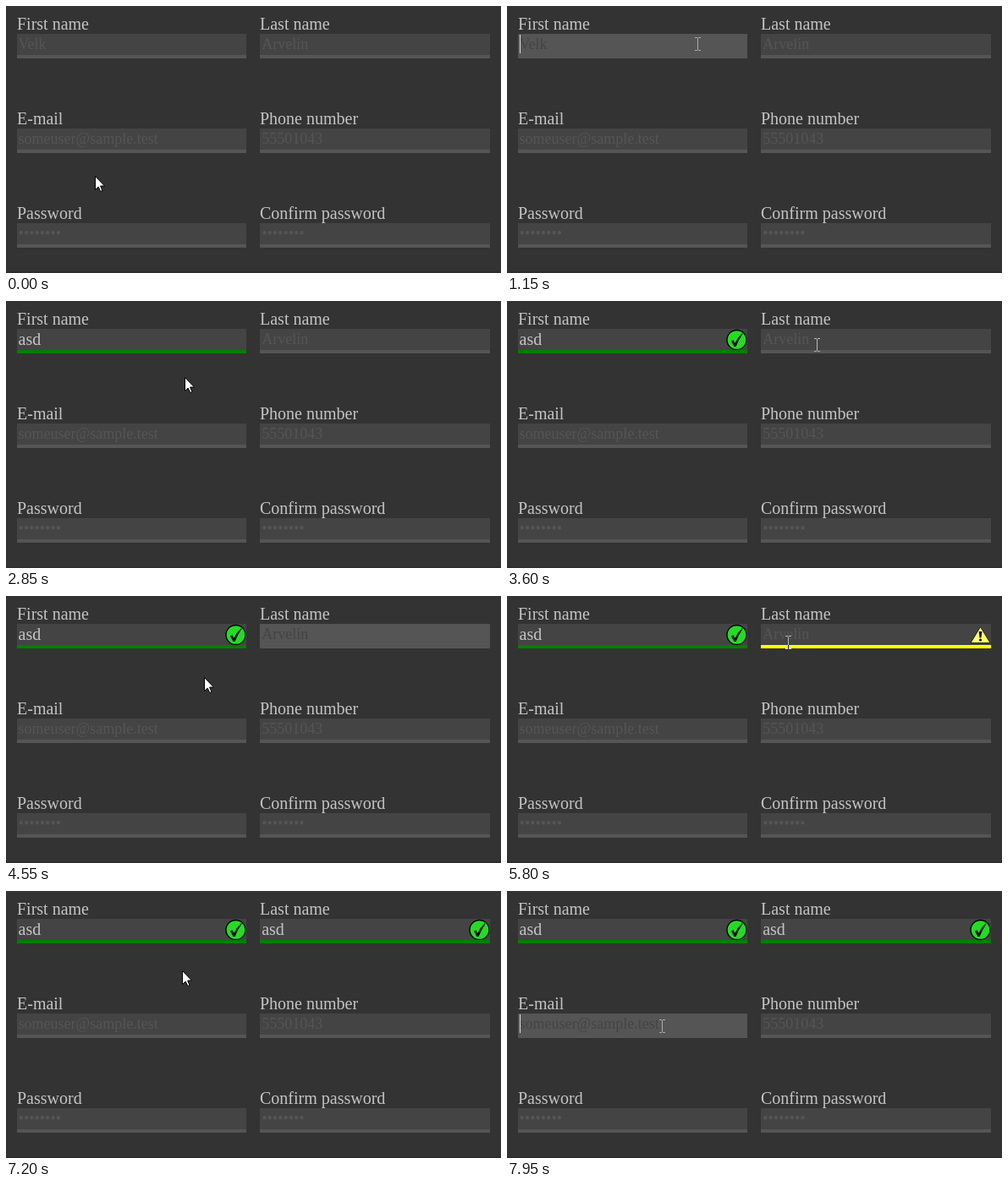
These frames come from a looping animation (585 by 316 pixels, 8 s). An HTML page:

```html
<!DOCTYPE html>
<html lang="en">
<head>
<meta charset="utf-8">
<title>Form validation</title>
<style>
  html, body { margin: 0; height: 100%; overflow: hidden; background: #333; }
  svg { display: block; width: 585px; height: 316px; font: 20px "Liberation Serif", serif; isolation: isolate; }
  .label, .value { fill: #c4c4c4; }
  .hint { font-size: 18px; }
  #beam { mix-blend-mode: difference; }
</style>
</head>
<body>
<svg id="stage" viewBox="0 0 585 316">
  <defs>
    <g id="check">
      <circle r="11.5" fill="#2d2" stroke="#000" stroke-width="1.3"/>
      <path d="M-6.5 1.5L-4 .2L-2 4Q1-3 6.5-8L7-7Q2 0-1 8H-3Z"/>
    </g>
    <g id="warn">
      <path d="M0-9.5L11.5 9.5H-11.5Z" fill="#ff6" stroke="#222" stroke-linejoin="round"/>
      <path d="M-1.8-4H1.8L.9 3.5H-.9Z"/>
      <circle cy="6" r="1.6"/>
    </g>
  </defs>
  <rect width="585" height="316" fill="#333"/>
  <rect y="314" width="585" height="2" fill="#2d2d2d"/>
  <g id="form"></g>
  <rect id="caret" width="1" height="22" fill="#ddd"/>
  <path id="beam" d="M-3-7.5H0M1-7.5H4M.5-7V7M-3 7.5H0M1 7.5H4" fill="none" stroke="#fff" shape-rendering="crispEdges"/>
  <path id="arrow" d="M.5.5V16.5L4.2 13L6.8 18.5L9 17.5L6.6 12H11.5Z" fill="#fff" stroke="#000"/>
</svg>
<script>
const LOOP = 8000, STEP = 50;
const $ = id => document.getElementById(id);

function add(name, attrs, text = '') {
  const el = document.createElementNS('http://www.w3.org/2000/svg', name);
  set(el, attrs);
  el.textContent = text;
  return $('form').appendChild(el);
}
function set(el, attrs) {
  for (const key in attrs) el.setAttribute(key, attrs[key]);
}
const show = (el, on) => set(el, { visibility: on ? 'visible' : 'hidden' });
const within = (t, spans = []) => spans.some(([from, to]) => t >= from && t < to);

function makeField(label, hint, col, row, timing = {}) {
  const x = col ? 300 : 13, y = 33 + row * 112, width = col ? 272 : 271;
  const textX = col ? 302.2 : 14.6;
  add('text', { x, y: y - 5, class: 'label' }, label);
  return {
    x, y, width, textX, ...timing,
    box: add('rect', { x, y, width, height: 25 }),
    line: add('rect', { x, y: y + 25, width, height: 4 }),
    hint: add('text', { x: textX, y: y + 18, class: 'hint' }, hint),
    value: add('text', { x: textX, y: y + 19, class: 'value' }),
    icon: add('use', { x: x + width - 12.5, y: y + 13 })
  };
}

const fields = [
  makeField('First name', 'Velk', 0, 0, {
    focus: [[1150, 2750]], caret: [[1150, 1700], [2200, 2750]],
    typed: 1900, icons: [[2900, LOOP]]
  }),
  makeField('Last name', 'Arvelin', 1, 0, {
    focus: [[4000, 5000], [5950, 7200]], caret: [[4000, 4550], [5950, 6450], [7000, 7200]],
    warned: 5000, typed: 6350, icons: [[5150, 5950], [7200, LOOP]]
  }),
  makeField('E-mail', 'someuser@sample.test', 0, 1, {
    focus: [[7900, LOOP]], caret: [[7950, LOOP]]
  }),
  makeField('Phone number', '55501043', 1, 1),
  makeField('Password', '••••••••', 0, 2),
  makeField('Confirm password', '••••••••', 1, 2)
];

// Pointer moves: start, end, x, y
const moves = [
  [0, 0, 105, 201], [0, 850, 224, 45], [850, 900, 225, 44.5],
  [1250, 1450, 221, 62], [2300, 2300, 220, 66], [2350, 2500, 211, 90],
  [3200, 3600, 366, 52], [4150, 4550, 234, 96], [5400, 5550, 314, 64],
  [5650, 5800, 332, 55], [6600, 6600, 324, 58], [6650, 6850, 208, 94],
  [7250, 7500, 183, 160]
];
const typingHides = [[1900, 2350], [6350, 6650]];

function pointerAt(t) {
  let px = 0, py = 0;
  for (const [from, to, x, y] of moves) {
    if (t < from) break;
    const p = to > from ? Math.min(1, (t - from) / (to - from)) : 1;
    const ease = p * p * (3 - 2 * p);
    px += (x - px) * ease;
    py += (y - py) * ease;
  }
  return [Math.round(px), Math.round(py)];
}

function drawField(f, t) {
  const focused = within(t, f.focus), valid = t >= f.typed, warned = t >= f.warned;
  set(f.box, { fill: focused ? '#555' : '#444' });
  set(f.line, { fill: valid ? '#008000' : warned ? '#ff0' : '#555' });
  set(f.hint, { fill: focused ? '#444' : '#555' });
  show(f.hint, !valid);
  f.value.textContent = valid ? 'asd'.slice(0, 1 + (t - f.typed) / STEP) : '';
  set(f.icon, { href: valid ? '#check' : '#warn' });
  show(f.icon, within(t, f.icons));
  if (within(t, f.caret)) {
    const end = f.textX + (valid ? f.value.getComputedTextLength() : 0);
    set($('caret'), { x: Math.round(end), y: f.y + 1 });
    show($('caret'), true);
  }
}

function draw(now) {
  const t = Math.floor(now % LOOP / STEP) * STEP;
  show($('caret'), false);
  fields.forEach(f => drawField(f, t));

  const [x, y] = pointerAt(t);
  const over = fields.some(f => x >= f.x && x < f.x + f.width && y >= f.y && y < f.y + 29);
  const visible = !within(t, typingHides);
  for (const id of ['beam', 'arrow']) {
    set($(id), { transform: `translate(${x} ${y})` });
    show($(id), visible && over === (id === 'beam'));
  }
}

const start = performance.now();
function tick() {
  draw(performance.now() - start);
  requestAnimationFrame(tick);
}
tick();
</script>
</body>
</html>
```
